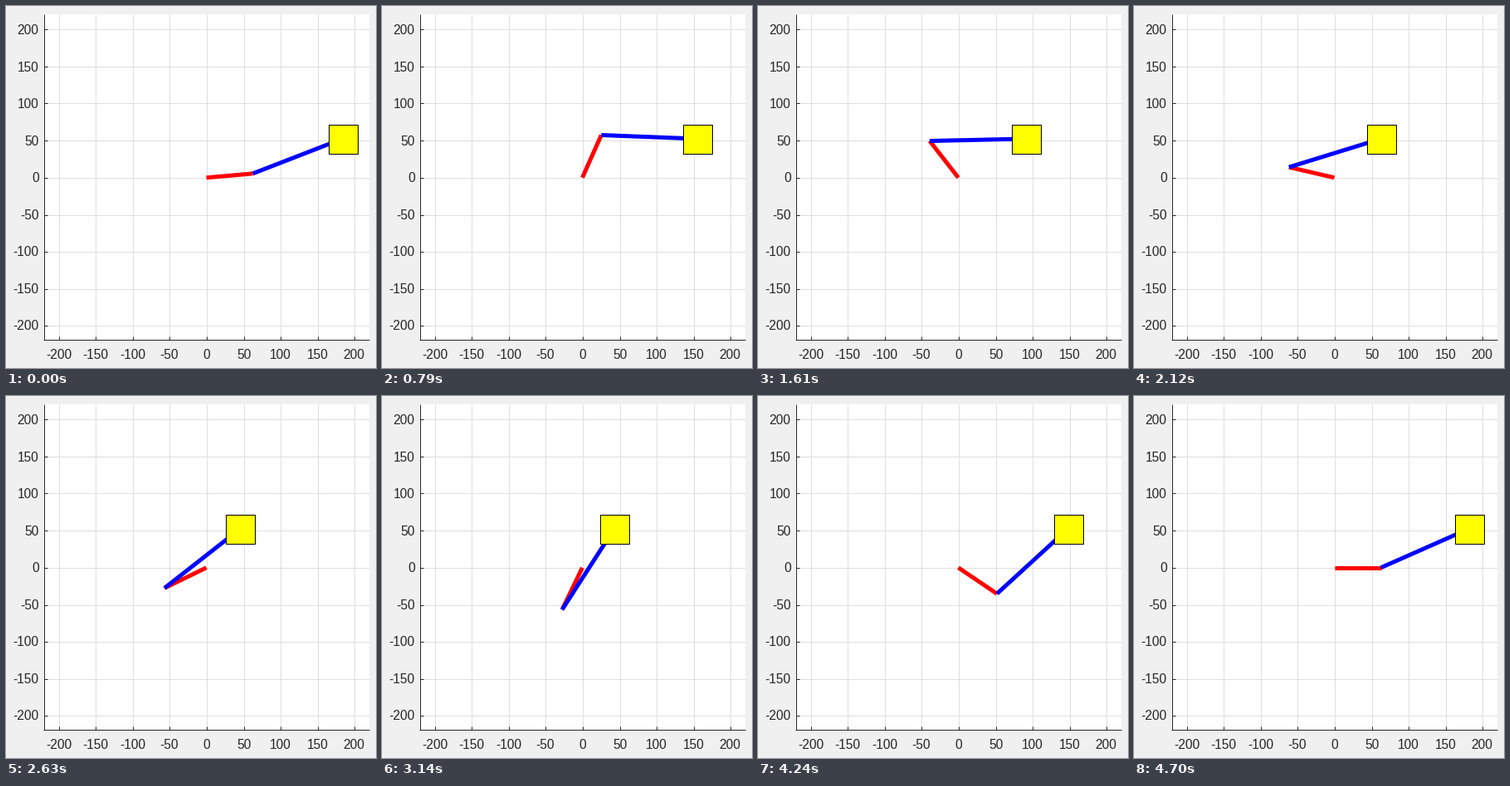
These frames come from a looping animation (446 by 436 pixels, 4750 ms). A matplotlib script:

```python
import math

import matplotlib.pyplot as plt
import numpy as np
from matplotlib.animation import FuncAnimation
from matplotlib.patches import Rectangle

# Stage and timing
W, H, DPI = 446, 436, 100
PX = 72 / DPI
LOOP_MS, TICK_MS = 4750, 10
STEP_MS, STEP_LEAD = 46.1, 4

# Plot area in pixels, and the place of the plot's origin
LEFT, RIGHT, TOP, BOTTOM = 45, 437, 10, 401
OX, OY, SCALE = 241, 206.25, 392 / 440
INK, GRID = "#262626", "#dedede"

# Slider-crank sizes in plot units
CRANK, ROD, OFFSET, BLOCK = 63, 130, 52.5, 39

# Crank angle in degrees at a few simulation steps
KEY_STEPS = [0, 17, 35, 57, 78, 92, 102]
KEY_ANGLES = [5, 66, 128, 206, 279, 326, 360]


def to_px(x, y):
    return OX + SCALE * x, OY - SCALE * y


def pose(step):
    """Crank pin and slider positions in plot units."""
    a = math.radians(np.interp(step, KEY_STEPS, KEY_ANGLES))
    px, py = CRANK * math.cos(a), CRANK * math.sin(a)
    slider = px + math.sqrt(ROD ** 2 - (OFFSET - py) ** 2)
    return (px, py), (slider, OFFSET)


fig = plt.figure(figsize=(W / DPI, H / DPI), dpi=DPI, facecolor="#f0f0f0")
ax = fig.add_axes([0, 0, 1, 1])
ax.set_xlim(-0.5, W - 0.5)
ax.set_ylim(H - 0.5, -0.5)
ax.axis("off")


def stroke(xs, ys, color, width=1, z=2):
    return ax.plot(xs, ys, color=color, lw=width * PX, zorder=z,
                   solid_capstyle="butt")[0]


def label(x, y, value, align):
    ax.text(x, y, str(value), ha=align, va="baseline", color=INK,
            family="Liberation Sans", size=15.5 * PX)


ax.add_patch(Rectangle((LEFT - 0.5, TOP - 0.5), RIGHT - LEFT + 1,
                       BOTTOM - TOP + 1, fc="white", lw=0, zorder=0))

for value in range(-200, 201, 50):
    gx, gy = (round(p) for p in to_px(value, value))
    stroke([gx, gx], [TOP - 0.5, BOTTOM], GRID, z=1)
    stroke([LEFT, RIGHT + 0.5], [gy, gy], GRID, z=1)
    stroke([gx, gx], [BOTTOM - 4, BOTTOM], INK)
    stroke([LEFT, LEFT + 4], [gy, gy], INK)
    label(gx, 424.5, value, "center")
    label(39, gy + 5.5, value, "right")

stroke([LEFT, LEFT], [TOP - 0.5, BOTTOM + 0.5], INK)
stroke([LEFT - 0.5, RIGHT + 0.5], [BOTTOM, BOTTOM], INK)

crank = stroke([], [], "#ff0000", 5, 3)
rod = stroke([], [], "#0000ff", 5, 4)
block = ax.add_patch(Rectangle((0, 0), 1, 1, fc="#ffff00", ec="black",
                               lw=PX, zorder=5))


def draw(i):
    step = int((i * TICK_MS + STEP_LEAD) / STEP_MS)
    pin, slider = pose(step)
    px, py = to_px(*pin)
    sx, sy = to_px(*slider)
    crank.set_data([OX, px], [OY, py])
    rod.set_data([px, sx], [py, sy])
    half = SCALE * BLOCK / 2
    x0, y0 = round(sx - half), round(sy - half)
    block.set_bounds(x0, y0, round(2 * half), round(2 * half))
    return crank, rod, block


anim = FuncAnimation(fig, draw, frames=LOOP_MS // TICK_MS, interval=TICK_MS,
                     repeat=True, repeat_delay=0, cache_frame_data=False)
plt.show()
```
